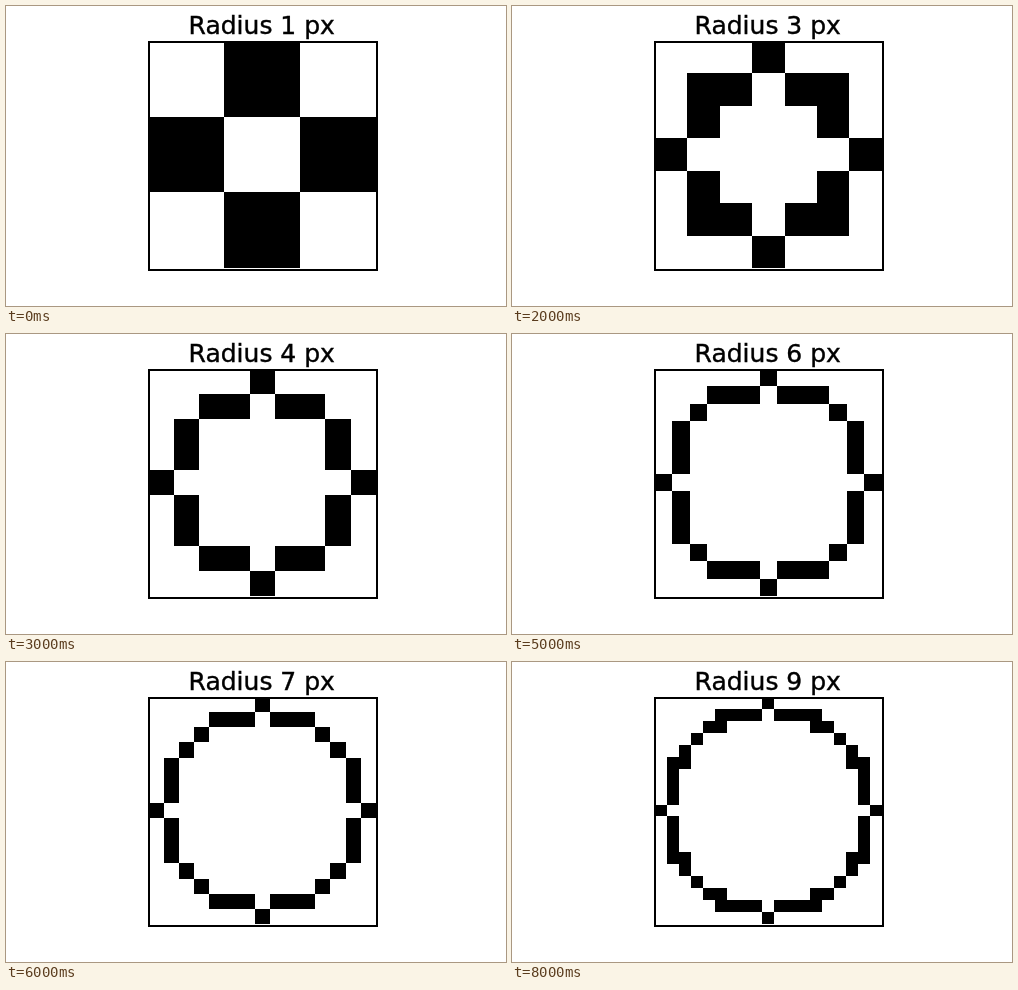
Animation, 500 px wide and 300 px high, one loop 9 s. Source, as an HTML page:

```html
<!DOCTYPE html>
<html lang="en">
<head>
<meta charset="utf-8">
<title>Pixel circles</title>
<style>
html, body { margin: 0; width: 100%; height: 100%; overflow: hidden; background: #fff; }
svg { display: block; }
text { font: 25px "DejaVu Sans", sans-serif; stroke: #000; stroke-width: .4px; }
</style>
</head>
<body>
<svg width="500" height="300" viewBox="0 0 500 300">
  <path id="cells" shape-rendering="crispEdges"/>
  <rect x="143" y="36" width="228" height="228" fill="none" stroke="#000" stroke-width="2"/>
  <text id="title" x="182.6" y="28"></text>
</svg>
<script>
const cells = document.getElementById('cells');
const title = document.getElementById('title');
const LEFT = 142.82, TOP = 35, SIZE = 227;
let shown = 0;

// A cell belongs to the ring when (r-1)² < x² + y² <= r².
function ring(r) {
  const step = SIZE / (2 * r + 1);
  const px = i => Math.round(LEFT + (i + r) * step);
  const py = i => Math.round(TOP + (i + r) * step);
  let d = '';
  for (let y = -r; y <= r; y++) {
    for (let x = -r; x <= r; x++) {
      const q = x * x + y * y;
      if (q > (r - 1) ** 2 && q <= r * r) {
        d += `M${px(x)} ${py(y)}H${px(x + 1)}V${py(y + 1)}H${px(x)}Z`;
      }
    }
  }
  return d;
}

function draw() {
  const r = 1 + Math.floor(performance.now() / 1000) % 9;
  if (r !== shown) {
    shown = r;
    cells.setAttribute('d', ring(r));
    title.textContent = `Radius ${r} px`;
  }
  requestAnimationFrame(draw);
}
draw();
</script>
</body>
</html>
```
